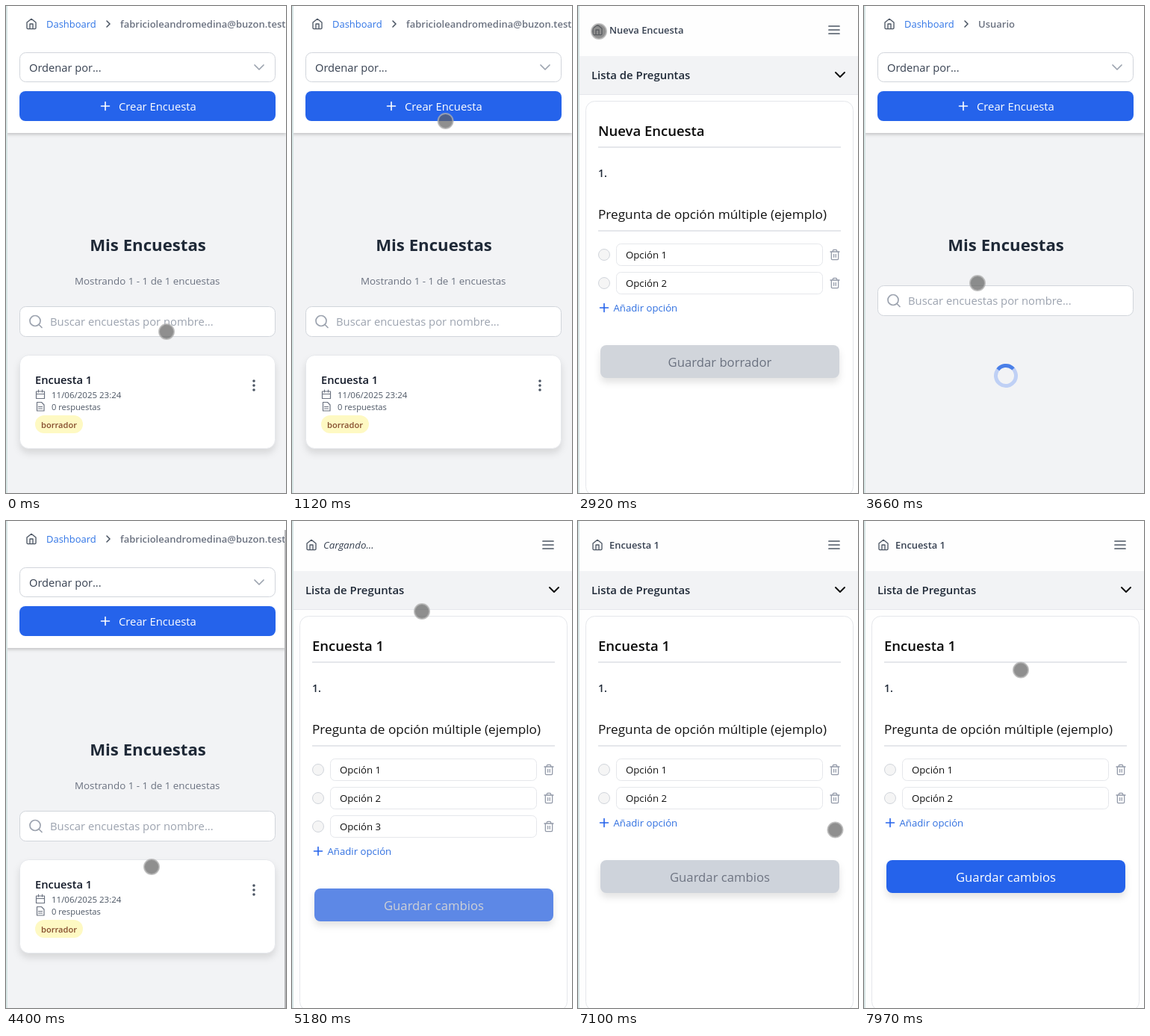
An HTML page that plays this animation: 375 px wide and 652 px high, repeating every 8 s.

```html
<!DOCTYPE html>
<html lang="es">
<head>
<meta charset="utf-8">
<title>Encuestas</title>
<style>
  html, body { margin: 0; width: 100%; height: 100%; overflow: hidden; background: #fff; }
  svg { display: block; width: 375px; height: 652px; font-family: "Open Sans", "Noto Sans", sans-serif; }
  .line { fill: none; stroke-linecap: round; stroke-linejoin: round; }
  .semi { font-weight: 600; }
  .bold { font-weight: 700; }
  .field { fill: #fff; stroke: #d1d5db; }
  .lift { filter: drop-shadow(0 6px 5px #0000001c); }
</style>
</head>
<body>
<svg viewBox="0 0 375 652">
  <defs>
    <path id="home" class="line" stroke-width="2" transform="scale(.667)"
      d="M3 9l9-7 9 7v11a2 2 0 0 1-2 2H5a2 2 0 0 1-2-2zM9 22V12h6v10"/>
    <path id="trash" class="line" stroke-width="1.9" transform="scale(.667)"
      d="M3 6h18M5 6v14q0 2 2 2h10q2 0 2-2V6M8 6V4q0-2 2-2h4q2 0 2 2v2M10 11v6M14 11v6"/>
    <path id="plus" class="line" stroke-width="1.6" d="M-5.500 0h11M0-5.500v11"/>
    <path id="down" class="line" d="M-6-3l6 6 6-6"/>
  </defs>

  <g id="list">
    <rect width="375" height="652" fill="#f2f3f5"/>
    <g id="content">
      <text class="bold" x="190" y="328" font-size="22.2" text-anchor="middle" fill="#1f2937">Mis Encuestas</text>
      <g id="search">
        <rect class="field" x="18.5" y="402.5" width="342" height="40" rx="8"/>
        <g class="line" stroke="#9ca3af" stroke-width="1.7">
          <circle cx="39" cy="421.5" r="7"/>
          <path d="M44 426.500l4 4"/>
        </g>
        <text x="59" y="428" font-size="14.8" fill="#9ca3af">Buscar encuestas por nombre...</text>
      </g>
      <g id="results">
        <text x="92" y="373" font-size="13.35" fill="#6b7280">Mostrando 1 - 1 de 1 encuestas</text>
        <rect class="lift" x="18.5" y="467.5" width="342" height="125" rx="12" fill="#fff" stroke="#e5e7eb"/>
        <text class="semi" x="39" y="506" font-size="14.7" fill="#111827">Encuesta 1</text>
        <path class="line" stroke="#4b5563" stroke-width="3.6" stroke-dasharray="0 6" d="M332 502v13"/>
        <g fill="#4b5563">
          <text x="61" y="525" font-size="11.5">11/06/2025 23:24</text>
          <text x="61" y="541" font-size="11.15">0 respuestas</text>
        </g>
        <path class="line" stroke="#6b7280" stroke-width="1.2"
          d="M40.500 516h11v9.500h-11zM40.500 519.500h11M43.500 514v3M48.500 514v3M41.500 530.500h6l3.500 3.500v8h-9.500zM43.500 536.500h5M43.500 539h5"/>
        <rect x="39" y="548" width="64" height="24" rx="12" fill="#fef9c3"/>
        <text class="semi" x="47" y="565" font-size="11.1" fill="#854d2e">borrador</text>
      </g>
    </g>
    <g id="spinner" fill="none" stroke-width="5">
      <circle cx="190" cy="495" r="13.5" stroke="#bfd0f5"/>
      <circle cx="190" cy="495" r="13.5" stroke="#4a7fe8" pathLength="360" stroke-dasharray="100 260"/>
    </g>
    <rect width="375" height="170" fill="#fff" style="filter:drop-shadow(0 2px 2px #0003)"/>
    <use href="#home" x="26" y="16" stroke="#4b5563"/>
    <text x="54" y="28.5" font-size="12.95" fill="#2f74e6">Dashboard</text>
    <path class="line" stroke="#4b5563" stroke-width="1.6" d="M135 20l4 4-4 4"/>
    <text id="user" class="semi" x="153" y="28.5" font-size="13" fill="#6b7280"></text>
    <rect class="field" x="18.5" y="62.5" width="342" height="39" rx="8"/>
    <text x="31" y="88" font-size="14.65" fill="#374151">Ordenar por...</text>
    <use href="#down" x="339" y="82" stroke="#9ca3af" stroke-width="1.7"/>
    <rect x="18" y="114" width="343" height="40" rx="8" fill="#2563eb"/>
    <use href="#plus" x="133" y="134" stroke="#fff"/>
    <text x="151" y="140" font-size="14.8" fill="#fff">Crear Encuesta</text>
    <rect id="bar" x="373" width="2" height="640" fill="#b4b4b6"/>
  </g>

  <g id="editor">
    <rect width="375" height="652" fill="#fefefe"/>
    <use href="#home" x="18" y="24" stroke="#4b5563"/>
    <text id="crumb" x="42" y="37" fill="#374151"></text>
    <path class="line" stroke="#4b5563" stroke-width="1.7" d="M336 27h14M336 32h14M336 37h14"/>
    <rect y="67" width="375" height="52" fill="#f2f3f5"/>
    <path stroke="#e5e7eb" d="M0 118.500h375"/>
    <text class="semi" x="18" y="98" font-size="14.9" fill="#1f2937">Lista de Preguntas</text>
    <use href="#down" x="351" y="92" stroke="#111" stroke-width="2"/>
    <rect x="10.5" y="127.5" width="358" height="528" rx="12" fill="#fff" stroke="#e5e7eb"/>
    <text id="title" class="semi" x="27" y="174" font-size="18.5" fill="#0a0a0a"></text>
    <path stroke="#e5e7eb" stroke-width="2" d="M27 189h325M27 301h325"/>
    <text class="semi" x="27" y="229" font-size="14" fill="#1f2937">1.</text>
    <text x="27" y="285" font-size="17.2" fill="#111">Pregunta de opción múltiple (ejemplo)</text>
    <g id="options"></g>
    <g id="actions">
      <use href="#plus" x="35" y="404" stroke="#2563eb"/>
      <text x="47.5" y="409" font-size="13.2" fill="#2f6fe0">Añadir opción</text>
      <rect id="save" class="lift" x="30" y="454" width="320" height="44" rx="8"/>
      <text id="saveText" x="190" y="483" font-size="16.7" text-anchor="middle"></text>
    </g>
  </g>

  <rect width="2" height="652" fill="#d6e4e4"/>
  <circle id="touch" r="10" stroke="#b0b0b0c0" stroke-width="2"/>
</svg>

<script>
const LOOP = 8000, ROW = 38;
const $ = id => document.getElementById(id);
const show = (id, on) => $(id).style.display = on ? "" : "none";
const shift = (id, y) => $(id).setAttribute("transform", `translate(0 ${y})`);
const during = (t, a, b) => t >= a && t < b;
const ramp = (t, a, b) => Math.min(1, Math.max(0, (t - a) / (b - a)));
const ease = p => p * p * (3 - 2 * p);
const mix = (a, b, p) => `rgb(${a.map((v, i) => Math.round(v + (b[i] - v) * p))})`;

const BLUE = [37, 99, 235], GREY = [209, 213, 219], WHITE = [255, 255, 255], SLATE = [107, 114, 128];

// when each page or state begins
const NEW = 1390, BACK = 3140, LOADED = 4060, EDIT = 4800, NAMED = 5500, REMOVED = 7100;

$("options").innerHTML = [1, 2, 3].map(n => `
  <g id="option${n}" transform="translate(0 ${ROW * (n - 1)})">
    <circle cx="35" cy="333" r="7.5" fill="#f5f5f5" stroke="#d1d5db"/>
    <rect x="51.5" y="318.5" width="276" height="29" rx="6" fill="#fff" stroke="#e5e7eb"/>
    <use href="#trash" x="336" y="325" stroke="#9299a8"/>
    <text x="64" y="338" font-size="13.2" fill="#111">Opción ${n}</text>
  </g>`).join("");

// pointer moves: start, end, x, y, sideways bow
const START = [215, 436];
const MOVES = [
  [180, 330, 154, 388],
  [500, 1250, 210, 134],
  [1880, 2120, 170, 482],
  [2180, 2850, 28, 34, 200],
  [3150, 3660, 152, 371],
  [3750, 4250, 195, 477],
  [4250, 4400, 195, 463],
  [4500, 5180, 174, 121],
  [5250, 6040, 195, 435, 60],
  [6200, 6900, 344.5, 413.5],
  [7710, 7970, 210, 199.5]
];

function pointer(t) {
  let [x, y] = START;
  for (const [from, to, nextX, nextY, bow = 0] of MOVES) {
    const p = ease(ramp(t, from, to));
    x += (nextX - x) * p + bow * Math.sin(Math.PI * p);
    y += (nextY - y) * p;
  }
  return [x, y];
}

function drawList(t) {
  const loading = during(t, BACK, LOADED);
  const scroll = 14 * ramp(t, 4250, 4390);
  shift("content", -scroll);
  shift("search", loading ? -28 : 0);
  show("results", !loading);
  show("spinner", loading);
  $("spinner").setAttribute("transform", `rotate(${t * 0.36 - 20} 190 495)`);
  $("user").textContent = loading ? "Usuario" : "fabricioleandromedina@buzon.test";
  show("bar", scroll > 0);
  shift("bar", scroll * 12 / 14);
}

function drawEditor(t) {
  const fresh = t < BACK, busy = during(t, EDIT, NAMED), three = during(t, EDIT, REMOVED);
  const name = fresh ? "Nueva Encuesta" : "Encuesta 1";
  $("crumb").textContent = busy ? "Cargando..." : name;
  $("crumb").style.cssText = busy ? "font-size: 13.3px; font-style: italic" : "font-size: 12.9px; font-weight: 600";
  $("title").textContent = name;
  show("option3", three);
  shift("actions", three ? ROW : 0);

  // the button greys out on loading and turns blue after an edit
  const loadAt = fresh ? 1440 : 5105;
  const grey = ease(ramp(t, loadAt, loadAt + 200) - ramp(t, REMOVED - 15, REMOVED + 190));
  $("save").setAttribute("fill", mix(BLUE, GREY, grey));
  $("saveText").setAttribute("fill", mix(WHITE, SLATE, grey));
  $("saveText").textContent = fresh ? "Guardar borrador" : "Guardar cambios";
}

function draw(t) {
  const list = t < NEW || during(t, BACK, EDIT);
  show("list", list);
  show("editor", !list);
  (list ? drawList : drawEditor)(t);

  const [x, y] = pointer(t), touch = $("touch");
  touch.setAttribute("cx", x);
  touch.setAttribute("cy", y);
  touch.setAttribute("fill", during(t, 2060, 2190) ? "#404040c0" : "#606060b3");
}

function tick() {
  draw(performance.now() % LOOP);
  requestAnimationFrame(tick);
}
tick();
</script>
</body>
</html>
```
